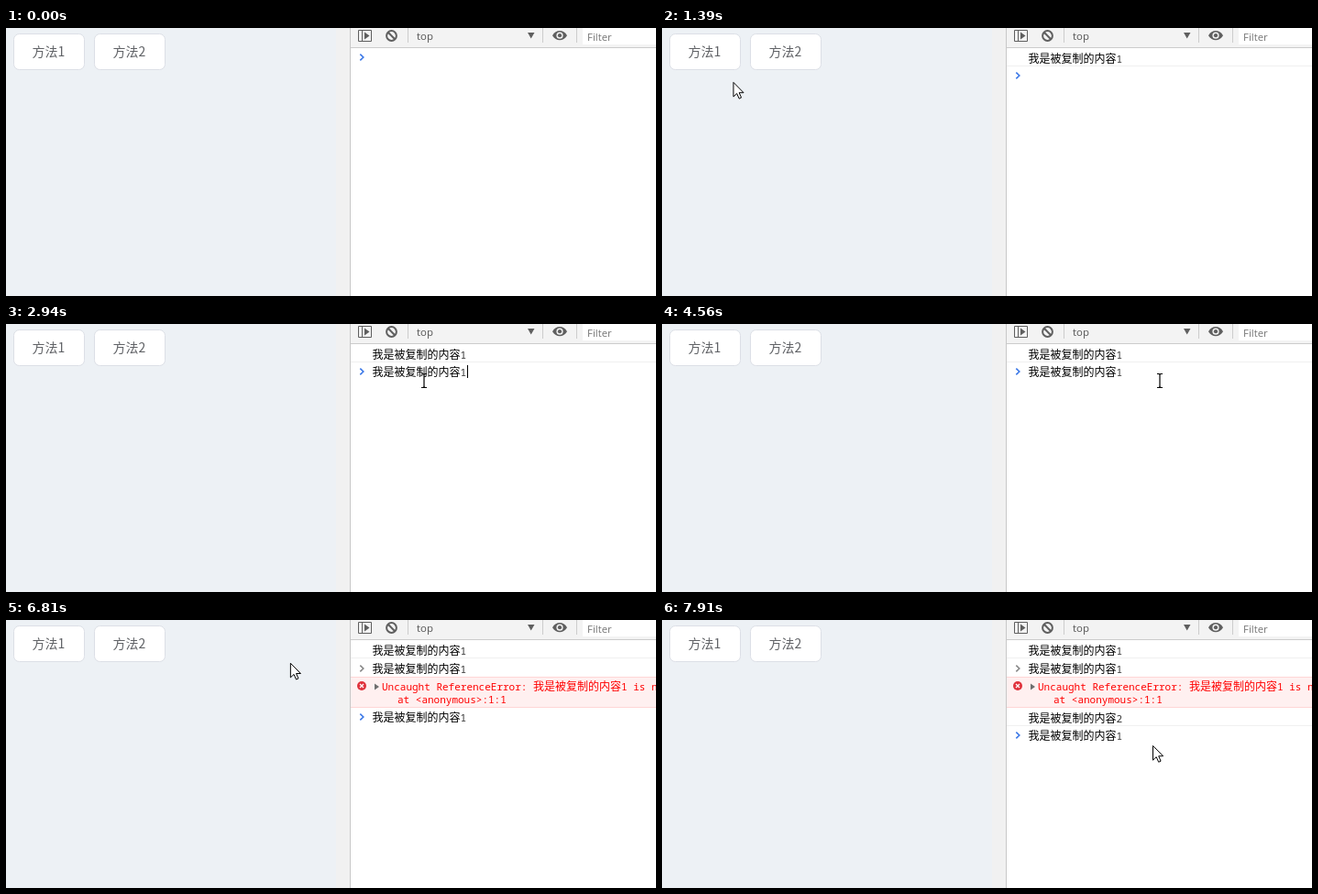
Animation of 709x293 px, one loop 8 s. Source, as an HTML page:

```html
<!DOCTYPE html>
<html lang="zh">
<head>
<meta charset="utf-8">
<title>Copy demo</title>
<style>
  html, body { margin: 0; width: 100%; height: 100%; overflow: hidden; background: #fff; }
  svg { display: block; }
  text { white-space: pre; }
  .cjk { font: 12px "Noto Sans CJK SC", "Noto Sans CJK JP", "Noto Sans CJK", sans-serif; }
  .mono { font: 11px "Noto Sans Mono", "Liberation Mono", monospace; }
  .ui { font: 11.4px "Open Sans", "Noto Sans", sans-serif; }
  .btn text { font-size: 14px; fill: #606266; }
  .btn rect { fill: #fff; stroke: #dcdfe6; }
  .btn.hover text { fill: #1f78d4; }
  .btn.hover rect { fill: #e9f3fd; stroke: #bbd6f3; }
  .btn.active rect { stroke: #2470cc; }
  .err { fill: #f00; }
</style>
</head>
<body>
<svg id="stage" width="709" height="293" viewBox="0 0 709 293"></svg>
<script>
const LOOP = 8000;
const stage = document.getElementById('stage');

const msg = n => `我是被复制的内容<tspan class="mono" fill="#333">${n}</tspan>`;
const line = (y, n) => `<text class="cjk" x="399.5" y="${y + 4.5}">${msg(n)}</text>`;
const rule = (y, color) => `<path d="M376 ${y + .5}H709" stroke="${color}"/>`;
const chevron = (y, color) =>
  `<path d="M386.3 ${y - 3.3}L389.8 ${y}L386.3 ${y + 3.3}" fill="none" stroke="${color}" stroke-width="1.6"/>`;
const button = (id, x, label) => `
  <g id="${id}" class="btn">
    <rect x="${x + .5}" y="6.5" width="77" height="39" rx="6"/>
    <text class="cjk" x="${x + 20.5}" y="31">${label}</text>
  </g>`;

const toolbar = `
  <rect x="376" width="333" height="21" fill="#f3f3f3"/>
  ${rule(21, '#ccc')}
  <path d="M438.5 0V16M585.5 0V16M622.5 0V16" stroke="#ccc"/>
  <rect x="629" width="80" height="18" fill="#fff"/>
  <g fill="none" stroke="#5f5f5f">
    <path d="M384.5 2.5H398.5V14.5H384.5ZM388.5 2.5V14.5"/>
    <circle cx="420.5" cy="8.5" r="5.4" stroke-width="2"/>
    <path d="M416.8 4.8L424.2 12.2" stroke-width="2"/>
  </g>
  <path d="M391 4.5L396.5 8.5L391 12.5ZM569 5H576.5L572.7 11.5Z" fill="#5f5f5f"/>
  <path d="M596 8.2C600 1.4 608 1.4 612 8.2C608 15 600 15 596 8.2Z" fill="#5f5f5f"/>
  <circle cx="604" cy="8.2" r="3.6" fill="#f3f3f3"/>
  <circle cx="604" cy="8.2" r="2.1" fill="#5f5f5f"/>
  <text class="ui" x="448" y="13" fill="#555">top</text>
  <text class="ui" x="634" y="13.5" fill="#757575">Filter</text>`;

const error = `
  <rect x="376" y="62" width="333" height="34" fill="#fff0f0"/>
  ${rule(62, '#ffd6d6')}${rule(95, '#ffd6d6')}
  <circle cx="388" cy="72" r="5" fill="#e0323c"/>
  <path d="M386 70L390 74M390 70L386 74" stroke="#fff" stroke-width="1.3"/>
  <path d="M402 69.5L407 73L402 76.5Z" fill="#6e6e6e"/>
  <text class="mono err" x="410" y="77">Uncaught ReferenceError: <tspan class="cjk">我是被复制的内容</tspan>1 is not defined</text>
  <text class="mono err" x="427" y="91">at &lt;anonymous&gt;:1:1</text>`;

const cursors = `
  <g id="cursor" stroke-linejoin="round">
    <path id="arrow" d="M.5 .5V16.2L4.2 12.7L6.7 18.3L9.1 17.2L6.7 11.8H11.6Z" fill="#fff" stroke="#000"/>
    <path id="beam" d="M-3 -7.5H-1L0 -6.8L1 -7.5H3M-3 7.5H-1L0 6.8L1 7.5H3M0 -7V7" fill="none" stroke="#000" stroke-width="1.2"/>
    <g id="hand" stroke="#000">
      <path d="M-2 2.2C-2 -.4 2 -.4 2 2.2V9C2 6.5 5 6.5 5 9.4C5.2 7 8 7.3 8 10C8.3 8 11 8.3 11 11V16C11 20 9 20 8.5 23.2H0C-1 20 -5 17 -6 14C-7 11.5 -3.5 11 -2 14.5Z" fill="#fff"/>
      <path d="M2 8V12M5 9V12.5M8 10V13" fill="none"/>
    </g>
  </g>`;

stage.innerHTML = `
  <rect width="360" height="293" fill="#edf1f5"/>
  <rect x="360" width="15" height="293" fill="#f1f1f1"/>
  <rect x="376" width="333" height="293" fill="#fff"/>
  ${button('btn1', 8, '方法1')}
  ${button('btn2', 96, '方法2')}
  ${toolbar}
  <path d="M375.5 0V293" stroke="#c8c8c8"/>
  <g id="log1">${line(33, 1)}${rule(41, '#f0f0f0')}</g>
  <g id="echo">${chevron(53, '#888')}${line(53, 1)}${error}</g>
  <g id="log2">${line(107, 2)}${rule(115, '#f0f0f0')}</g>
  <g id="prompt">
    ${chevron(0, '#3b78e7')}
    <g id="typed">${line(0, 1)}</g>
    <rect id="caret" y="-7" width="1" height="14" fill="#000"/>
  </g>
  <circle id="spot" r="12" fill="#f6f040" opacity=".75"/>
  ${cursors}`;

const el = {};
stage.querySelectorAll('[id]').forEach(e => el[e.id] = e);

// Pointer trips: first step, last step, step count, destination, sag
const trips = [
  [70, 370, 5, 140, 146, 0],
  [520, 920, 6, 48.5, 38.5, 0],
  [1150, 1150, 1, 64, 58, 0],
  [1390, 2010, 9, 456, 62, 6],
  [4030, 4330, 5, 543, 62, 3],
  [5110, 5110, 1, 541, 61, 0],
  [6430, 7040, 9, 144.5, 36.5, 0],
  [7590, 7910, 5, 535, 137, 0]
];
const presses = [[1000, 1070], [2390, 2470], [7210, 7350]];
const blinks = [[2390, 3490], [4030, 4560], [5110, 5650], [5880, 6430], [6980, 7210]];

const within = (t, spans) => spans.some(([a, b]) => t >= a && t < b);
const show = (e, on) => e.setAttribute('display', on ? 'inline' : 'none');
const move = (e, x, y) => e.setAttribute('transform', `translate(${x} ${y})`);

function pointer(t) {
  let x = 592, y = 275;
  for (const [start, end, n, tx, ty, sag] of trips) {
    if (t < start) break;
    const gap = (end - start) / (n - 1 || 1);
    const k = t >= end ? n : Math.floor((t - start) / gap) + 1;
    const u = k / n, s = u * u * (3 - 2 * u);
    x += (tx - x) * s;
    y += (ty - y) * s + 4 * sag * s * (1 - s);
    if (k < n) break;
  }
  return [x, y];
}

function draw(t) {
  const [x, y] = pointer(t);
  const row = t < 1070 ? 32 : t < 5110 ? 52 : t < 7350 ? 106 : 126;
  const pasted = (t >= 2940 && t < 5110) || t >= 5880;
  const pressed = within(t, presses);

  show(el.log1, t >= 1070);
  show(el.echo, t >= 5110);
  show(el.log2, t >= 7350);
  move(el.prompt, 0, row);
  show(el.typed, pasted);
  show(el.caret, within(t, blinks));
  el.caret.setAttribute('x', pasted ? 503 : 400);

  let over = false;
  [[el.btn1, 8], [el.btn2, 96]].forEach(([b, left]) => {
    const hit = x >= left && x < left + 78 && y >= 6 && y < 46;
    b.classList.toggle('hover', hit);
    b.classList.toggle('active', hit && pressed);
    over = over || hit;
  });

  const editing = x > 400 && Math.abs(y - row) <= 10.5;
  show(el.cursor, t >= 70);
  show(el.hand, over);
  show(el.beam, !over && editing);
  show(el.arrow, !over && !editing);
  move(el.cursor, x, y);
  show(el.spot, pressed);
  move(el.spot, x - 1, y);
}

const t0 = performance.now();
function tick() {
  draw((performance.now() - t0) % LOOP);
  requestAnimationFrame(tick);
}
tick();
</script>
</body>
</html>
```
